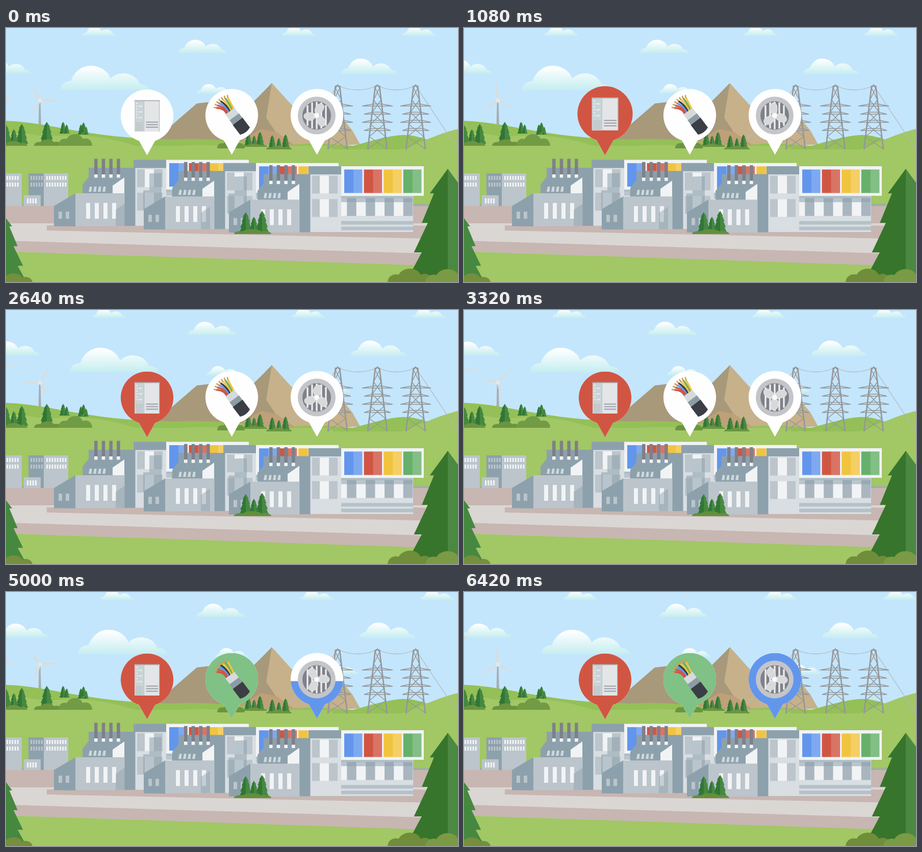
These frames come from a looping animation (886 by 498 pixels, 6440 ms). An HTML page:

```html
<!DOCTYPE html>
<html lang="en">
<head>
<meta charset="utf-8">
<title>Factory valley</title>
<style>
html, body { margin: 0; width: 100%; height: 100%; overflow: hidden; background: #c3e6fd; }
svg { display: block; width: 886px; height: 498px; }
</style>
</head>
<body>
<script>
const rect = (x, y, w, h, fill) => `<rect x="${x}" y="${y}" width="${w}" height="${h}" fill="${fill}"/>`;
const poly = (points, fill) => `<polygon points="${points}" fill="${fill}"/>`;
const path = (d, fill) => `<path d="${d}" fill="${fill}"/>`;
const line = (d, color, width) => `<path d="${d}" fill="none" stroke="${color}" stroke-width="${width}"/>`;
const circle = (x, y, r, fill) => `<circle cx="${x}" cy="${y}" r="${r}" fill="${fill}"/>`;
const group = (x, y, content) => `<g transform="translate(${x} ${y})">${content}</g>`;
const many = (list, fn) => list.map(fn).join('');
const times = (n, fn) => many([...Array(n).keys()], fn);

const DARK = '#8da1ac', MID = '#bbc5cb', PALE = '#d8dee2', WHITE = '#f1f3f5', SHADE = 'rgba(141,161,172,.55)';
const GRASS = '#a2c765', HILL = '#94c057', MAUVE = '#c7b6b2', ROAD = '#dad6d3', BUSH = '#6c9440';
const RED = '#d15543', BLUE = '#6296ec', GREEN = '#66b06b', YELLOW = '#f1c440';

const cloud = (x, y, s) => `<path transform="translate(${x} ${y}) scale(${s})" fill="url(#mist)"
  d="M0 48C2 36 8 31 21 30C28 12 42 0 60 0C80 0 95 12 99 25C106 18 115 15 124 15C140 15 152 24 156 36C166 36 174 40 175 48Z"/>`;

const clouds = () => many([150, 541, 777], x => cloud(x, -3, .38)) + cloud(106, 74, 1) + cloud(338, 23, .543) +
  cloud(657, 60, .63) + cloud(-50, 62, .56) + cloud(374, 110, .38) + cloud(586, 142, .4);

// Four tiers, each wider than the one above; the notch cuts back by a fifth
function tree(x, top, w, h, dark = '#327636', light = '#468840') {
  const half = side => {
    let points = `${x},${top}`;
    for (let k = 1; k <= 4; k++) {
      const reach = side * w * (.24 + .19 * k), y = top + h * (.217 + .261 * (k - 1));
      points += ` ${x + reach},${y} ${x + reach * (k < 4 ? .77 : 0)},${y}`;
    }
    return points;
  };
  return poly(half(-1), dark) + poly(half(1), light);
}

// A row of trees in which every second one is shorter
const grove = (x, base, n, step, h) => times(n, k => {
  const size = h * (k % 2 ? .78 : 1 + .03 * k);
  return tree(x + k * step, base - size, size * .32, size);
});

const bush = (x, base, w, h, fill = BUSH) => path(`M${x} ${base}c0 ${-h * .6} ${w * .16} ${-h * .7} ${w * .24} ${-h * .6}
  c${w * .1} ${-h * .6} ${w * .4} ${-h * .6} ${w * .48} 0c${w * .14} ${-h * .2} ${w * .28} ${h * .1} ${w * .28} ${h * .6}Z`, fill);

function rotor(id, x, y, r) {
  const blade = k => `<path transform="rotate(${k * 120})" fill="#d9dddd" d="M0 -2L${r * .22} -3.2L${r} 0L${r * .25} 2L0 2Z"/>`;
  return group(x, y, `<g id="${id}">${times(3, blade)}</g>` + circle(0, 0, 4.2, '#e4e7e8'));
}

function pylon(x) {
  const half = y => 4 + 15 * (y - 113) / 125;
  let body = 'M-5 117L0 112L5 117M-4 113L-19 238M4 113L19 238', arms = '', lattice = '';
  for (let k = 0; k < 4; k++) {
    const y = 149 + 16 * k, w = k % 2 ? 26 : 30;
    arms += `M${-w} ${y + 4}L${-half(y)} ${y}H${half(y)}L${w} ${y + 4}M${-w} ${y + 4}H${w}`;
  }
  for (let y = 117; y < 230; y += 24) {
    const a = half(y), b = half(y + 24);
    lattice += `M${-a} ${y}L${b} ${y + 24}M${a} ${y}L${-b} ${y + 24}`;
  }
  return group(x, 0, line(body, '#949699', 2.6) + line(arms + lattice, '#949699', 1.5));
}

const scenery = () =>
  poly('292,222 330,186 374,148 408,144 450,180 521,108 570,222', '#a8997a') +
  poly('521,108 510,176 530,206 560,236 694,228 679,201 655,172 600,164 560,151', '#c6b18a') +
  poly('440,234 500,198 530,204 575,236', '#bfa078') +
  poly('64.8,144 67.6,144 69,194 63.5,194', '#a9adaf') + rotor('near', 66.5, 142, 42) + rotor('far', -20, 120, 57) +
  path('M0 182C50 184 90 193 130 200S230 217 320 218V240H0Z', HILL) +
  path('M0 207C35 201 60 215 95 212S190 206 280 240H0Z', GRASS) +
  path('M240 236C290 216 350 216 410 219S540 234 620 238Z', HILL) +
  path('M300 238C350 227 390 228 450 233S560 226 650 238Z', GRASS) +
  path('M520 240C560 222 620 226 680 231C715 222 745 212 775 210S830 222 886 238Z', HILL) +
  path('M770 240C815 224 850 206 886 198V240Z', GRASS) +
  rect(0, 231, 640, 120, GRASS) + rect(600, 238, 286, 112, GRASS) +
  line('M650 113Q690 130 728 113Q765 130 803 113L886 238M650 113Q612 170 555 218', '#b4b7ba', 1.3) +
  many([650, 728, 803], pylon) +
  grove(0, 227, 3, 15.5, 37) + grove(80, 230, 1, 0, 46) + grove(112, 207, 2, 7, 23) + grove(147, 209, 2, 10, 20) +
  grove(152, 205, 1, 0, 20) + grove(475, 231, 3, 11.5, 26) + grove(522, 235, 3, 13, 25) +
  bush(-10, 231, 52, 9) + bush(55, 231, 54, 12) + bush(103, 231, 66, 22, '#729b45') +
  bush(414, 236, 54, 16) + bush(462, 233, 50, 6) + bush(510, 238, 50, 7);

const ground = () =>
  rect(0, 345, 886, 4, '#9cb29b') + rect(0, 349, 886, 36, MAUVE) +
  poly('0,383 886,383 886,446 0,420', ROAD) +
  poly('80,387 798,387 830,388 830,413 80,397', MAUVE) +
  poly('0,417 886,444 886,469 0,438', MAUVE) +
  poly('0,438 886,468 886,498 0,498', GRASS);

const windows = (x, y, n, step, w, h, fill) => times(n, k => rect(x + k * step, y, w, h, fill));

const offices = () => rect(0, 285, 31, 64, MID) + rect(44, 285, 30, 64, DARK) + rect(74, 285, 48, 64, MID) +
  rect(35, 328, 33, 21, MID) + windows(41, 334, 4, 5.3, 3.2, 10, WHITE) +
  many([290, 303], y => windows(1, y, 5, 5.2, 3, 8, WHITE) + windows(48, y, 5, 5.2, 3, 8, MID) + windows(79, y, 8, 5.2, 3, 8, WHITE));

// Each works stands a fixed step to the right of and below the one before
function factory(i) {
  const wing = rect(253, 316, 202, 71.5, PALE) +
    times(8, k => rect(307 + k * 18.4, 321, 18.4, 35, k % 2 ? '#a9b6c0' : WHITE)) +
    rect(307, 317, 147, 12, SHADE) + rect(256, 366, 199, 7, '#b5c1c9') + rect(256, 377, 199, 7, '#b5c1c9');
  const sign = rect(313, 258.5, 163, 58, WHITE) +
    many([BLUE, RED, YELLOW, GREEN], (c, k) => rect(320 + k * 38.6, 265, 35.5, 46, c)) +
    times(4, k => rect(338 + k * 38.6, 265, 17.5, 46, 'rgba(255,255,255,.18)'));
  const hall = rect(253, 274, 61, 113.5, PALE) +
    many([277, 323], y => rect(257, y, 50, 35, MID) + rect(272, y, 18, 35, WHITE)) +
    rect(250, 258.5, 64, 16, DARK) + rect(232, 274, 21.5, 114, DARK);
  const shadow = poly('105,279 129,278 129,340 93,350 93,312 105,312', SHADE) +
    poly('39,350 57,338 57,382 39,382', 'rgba(141,161,172,.45)');
  const tower = poly('162,274 233,274 233,325 150,325 150,307 162,292', DARK) +
    windows(173, 256.5, 4, 14.7, 6.5, 31, '#7e8089') + windows(173, 287, 4, 14.7, 6.5, 6.5, WHITE) +
    poly('209,309 232,293 232,325 209,325', WHITE) +
    times(4, k => `<g transform="translate(${162 + 9 * k} 311)">${poly('0,10 2,0 6.500,0 5.500,10', '#cfd8dd')}</g>`);
  const front = poly('94,349 136,324 136,389 94,388.5', DARK) + rect(136, 324, 96.5, 64.5, MID) +
    windows(103, 360, 2, 14, 7, 14, MID) + windows(157, 343, 4, 17, 8, 31, WHITE);
  return group(171.5 * i + (i % 2) * 4.5, 6.25 * i, wing + sign + hall + (i ? shadow : '') + tower + front);
}

const foreground = () => grove(470, 402, 3, 16, 41) + bush(447, 404, 73, 9, '#628f3c') +
  tree(866, 276, 82, 222, '#37752c', '#4b8842') + tree(-12, 357, 56, 148) +
  bush(748, 500, 90, 27, '#6f8d3b') + bush(822, 500, 90, 26, '#7b9a45') + bush(-20, 500, 72, 18, '#748f3d');

const cabinet = () => rect(252, 142, 49, 61, '#e3e5e7') + rect(252, 142, 19, 61, '#cbd3d6') + rect(251.5, 141.5, 50, 1.8, '#a9adb1') +
  rect(270, 143, 1, 60, '#b9bdc0') + rect(300, 142, 1.2, 61, '#b3b7ba') +
  times(6, k => rect(255, 147 + 5.5 * k, 3, 2, '#e6eff0') + rect(260, 147 + 5.5 * k, 7, 2, k % 2 ? '#e6eff0' : '#b4dade')) +
  times(6, k => rect(254, 185 + 3 * k, 14, 1, '#b2babd')) + times(3, k => rect(274.5, 183.5 + 5 * k, 23.5, 2, '#9c9da9'));

// Wires leave the sleeve together and fan out to copper tips
function cable() {
  const colors = [RED, RED, BLUE, '#3a3d42', YELLOW, GREEN, YELLOW];
  const wire = (color, k) => {
    const a = (195 + 11 * k) * Math.PI / 180, at = r => `${439 + r * Math.cos(a)} ${164 + r * Math.sin(a)}`;
    const x = 434 + 2.2 * k, y = 170 - 1.6 * k;
    return line(`M${x} ${y}Q${x - 7} ${y - 14} ${at(28)}`, color, 3.6) + line(`M${at(27)}L${at(33)}`, '#cf9a5c', 2.6);
  };
  return many(colors, wire) + `<g transform="translate(439 163) rotate(-37)">${rect(-11, 0, 22, 15, '#d6dadd')}` +
    `${rect(-11.5, 14, 23, 12, '#8b9ca5')}${path('M-12 25H12V49Q0 54 -12 49Z', '#3b3e44')}</g>`;
}

function fan() {
  const bar = k => {
    const x = 9 * (k - 2), h = Math.sqrt(27 ** 2 - x ** 2);
    return rect(x - 1.7, -h, 3.4, 2 * h, '#eceded');
  };
  const vane = k => `<path transform="rotate(${k * 120})" fill="#d8d9da" stroke="#f2f2f2" stroke-width=".8"
    d="M2 -3C8 -12 22 -11 25 -2C26 6 17 8 3 4Z"/>`;
  return group(609, 171.5, circle(0, 0, 37, '#c4c5c8') + circle(0, 0, 28, '#7f818a') + times(5, bar) +
    `<g id="fan">${times(3, vane)}</g>` + circle(0, 0, 5, '#fafafa'));
}

// Durations and start times count poses
const FILL = 8.75, PULSE = 9, PIN_H = 129;
const pins = [
  { x: 276.5, y: 249.5, color: RED, icon: cabinet, start: 9 },
  { x: 442.5, y: 248.5, color: '#80c185', icon: cable, start: 71 },
  { x: 609.5, y: 248.5, color: BLUE, icon: fan, start: 101 },
];

function pin({ x, y, color, icon }, i) {
  const cy = y - 77.4;
  const shape = fill => circle(x, cy, 51.6, fill) + poly(`${x - 18},${cy + 45} ${x + 18},${cy + 45} ${x},${y}`, fill);
  return `<clipPath id="clip${i}"><rect id="level${i}" x="${x - 60}" width="120" height="140"/></clipPath>
    <g id="pin${i}">${shape('#fefefe')}<g clip-path="url(#clip${i})">${shape(color)}</g>${icon()}</g>`;
}

document.body.innerHTML = `<svg viewBox="0 0 886 498">
  <defs><linearGradient id="mist" x2="0" y2="1"><stop offset=".05" stop-color="#fff"/><stop offset="1" stop-color="#c5edf0"/></linearGradient></defs>
  ${rect(0, 0, 886, 498, '#c3e6fd')}
  <g id="clouds">${clouds()}</g>
  ${scenery()}${ground()}${offices()}${times(3, factory)}${foreground()}${many(pins, pin)}
</svg>`;

const LOOP = 6440, BEAT = 140;
const set = (id, transform) => document.getElementById(id).setAttribute('transform', transform);
const clamp = v => Math.max(0, Math.min(1, v));

// Each beat holds one pose for 100 ms, then shows two more for 20 ms each
function poseAt(ms) {
  const rest = ms % BEAT;
  return 3 * Math.floor(ms / BEAT) + (rest < 100 ? 0 : rest < 120 ? 1 : 2);
}

function draw(ms) {
  const n = poseAt(ms);
  set('clouds', `translate(${n * .329})`);
  set('near', `rotate(${2 + 1.06 * n})`);
  set('far', `rotate(${40 + 1.06 * n})`);
  set('fan', `rotate(${58 + 4 * n})`);
  pins.forEach(({ x, y, start }, i) => {
    const level = clamp((n - start) / FILL);
    const swell = 1 + .05 * Math.sin(Math.PI * clamp((n - start - FILL) / PULSE));
    document.getElementById('level' + i).setAttribute('y', y - level * PIN_H);
    set('pin' + i, `translate(${x} ${y}) scale(${swell}) translate(${-x} ${-y})`);
  });
}

const origin = performance.now();
function tick() {
  draw((performance.now() - origin) % LOOP);
  requestAnimationFrame(tick);
}
tick();
</script>
</body>
</html>
```
